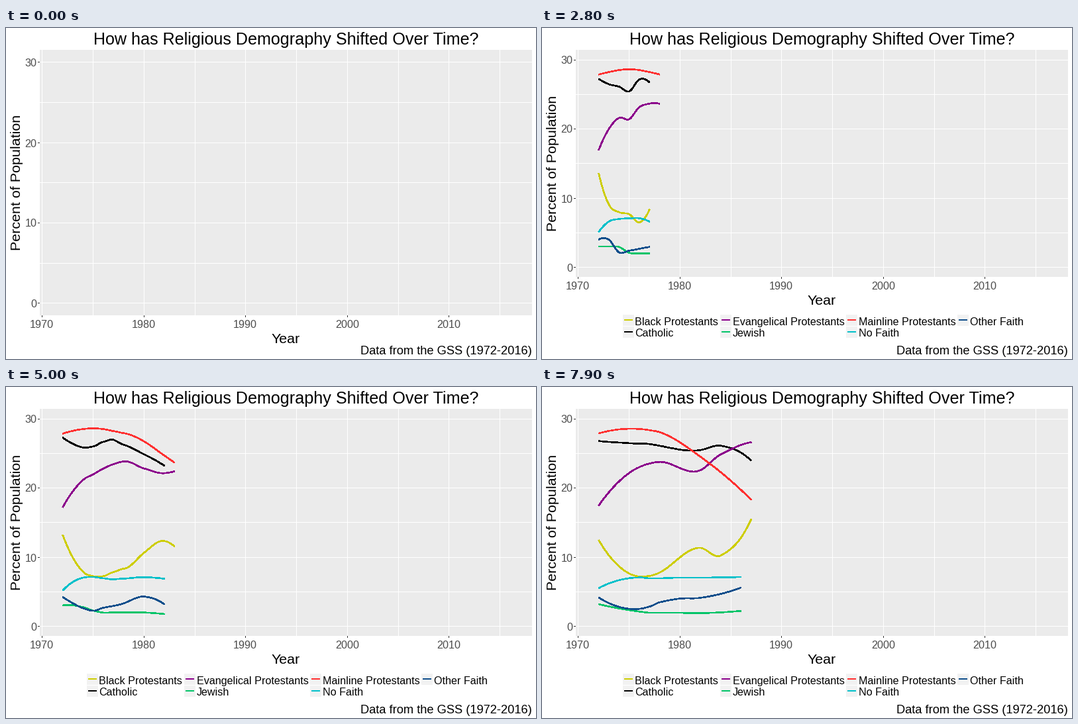
Write a matplotlib script that moves like this. It is 800 by 500 pixels and loops after 8000 ms.

```python
import numpy as np
import matplotlib.pyplot as plt
from matplotlib.animation import FuncAnimation
from matplotlib.patches import Rectangle

W, H, DPI = 800, 500, 100
FRAMES, INTERVAL = 80, 100
LEFT, RIGHT, TOP = 51, 794, 33
FONT = "Liberation Sans"

YEARS = np.array([y for y in range(1972, 1988) if y not in (1979, 1981)], float)
T = YEARS - YEARS[0]


def bump(centre, width):
    return np.exp(-((T - centre) / width) ** 2)


def step(centre, rate):
    return 1 / (1 + np.exp(-rate * (T - centre)))


def settle(rate):
    return np.exp(-rate * T)


# Trend of each group in percent, in the order in which rows are revealed.
SHARES = {
    "Evangelical Protestants": 24 - 7 * settle(0.55) - 1.2 * bump(3, 0.5)
    - 1.8 * bump(10, 1) + 4.8 * bump(13.8, 2),
    "Mainline Protestants": 27.5 + 1.2 * bump(3, 3) - 7 * step(11.2, 1.6),
    "Black Protestants": 7.6 + 6 * settle(1.4) - 1.2 * bump(4, 0.5)
    + 1.1 * bump(5.5, 0.9) + 1.4 * bump(15, 1),
    "Catholic": 25.9 + 1.4 * settle(0.8) - 0.8 * bump(3, 0.5)
    + 1.4 * bump(4.3, 1) - 0.9 * bump(8, 1.2) + 1.5 * bump(11.5, 2),
    "Jewish": 3 - step(2.5, 5) + 0.4 * step(14, 1.5),
    "Other Faith": 4 - 1.9 * step(1.5, 8) + 0.28 * np.maximum(T - 2, 0)
    + 0.9 * bump(8, 0.8) - 0.8 * bump(10, 0.5),
    "No Faith": 7.1 - 2 * settle(1.4) - 0.5 * bump(5, 0.5)
    + 0.8 * bump(10, 0.5),
}
COLORS = {
    "Black Protestants": "#CDCD00", "Catholic": "#000000",
    "Evangelical Protestants": "#8B008B", "Jewish": "#00C468",
    "Mainline Protestants": "#FF3030", "No Faith": "#00C0CA",
    "Other Faith": "#104E8B",
}
GROUPS = list(SHARES)
KEY_COLUMNS = [122, 269, 459, 627]

# Two survey years oversampled one group, which dilutes all the others.
OVERSAMPLE = 0.13
oversampled = np.isin(YEARS, (1982, 1987))
for group, share in SHARES.items():
    share[oversampled] *= 1 - OVERSAMPLE
SHARES["Black Protestants"][oversampled] += 100 * OVERSAMPLE


def cell_cuts(x, low, high, limit):
    """Cut points of a k-d tree whose cells hold at most `limit` points."""
    if high - low + 1 <= limit:
        return set()
    if low == high:
        return {x[low - 1]}
    mid = (low + high) // 2
    return ({x[mid - 1]} | cell_cuts(x, low, mid, limit)
            | cell_cuts(x, mid + 1, high, limit))


def local_fit(x, y, at, neighbours):
    """Value and slope of the tricube-weighted local quadratic."""
    dist = np.abs(x - at)
    radius = np.sort(dist)[neighbours - 1]
    weight = np.where(dist < 0.9995 * radius,
                      (1 - np.minimum(dist / radius, 1) ** 3) ** 3, 0)
    root = np.sqrt(weight)
    design = np.vander(x - at, 3, increasing=True) * root[:, None]
    norm = np.linalg.norm(design, axis=0)
    norm[norm == 0] = 1
    coef = np.linalg.lstsq(design / norm, y * root, rcond=1e-10)[0] / norm
    return coef[0], coef[1]


def loess(x, y, span=0.75, samples=80):
    """Local regression at tree vertices, joined by cubic Hermite pieces."""
    n = len(x)
    margin = 0.005 * max(x[-1] - x[0], 0.001 * x[-1])
    cuts = cell_cuts(x, 1, n, int(n * span * 0.2))
    knots = np.array(sorted(cuts | {x[0] - margin, x[-1] + margin}))
    neighbours = int(n * span + 1e-5)
    value, slope = np.array([local_fit(x, y, k, neighbours) for k in knots]).T

    grid = np.linspace(x[0], x[-1], samples)
    i = np.clip(np.searchsorted(knots, grid, "right") - 1, 0, len(knots) - 2)
    h = knots[i + 1] - knots[i]
    t = (grid - knots[i]) / h
    curve = ((1 + 2 * t) * (1 - t) ** 2 * value[i]
             + t * (1 - t) ** 2 * h * slope[i]
             + t * t * (3 - 2 * t) * value[i + 1]
             + t * t * (t - 1) * h * slope[i + 1])
    return grid, curve


fig = plt.figure(figsize=(W / DPI, H / DPI), dpi=DPI, facecolor="white")
ax = fig.add_axes([0, 0, 1, 1])


def box(x, y, w, h, color):
    ax.add_patch(Rectangle((x, y), w, h, fc=color, lw=0, antialiased=False))


def label(x, y, text, px, color="black", ha="center", rotation=0):
    ax.text(x, y, text, size=px * 72 / DPI, color=color, ha=ha, va="baseline",
            family=FONT, rotation=rotation, rotation_mode="anchor")


def stroke(x, y, color):
    ax.plot(x, y, color=color, lw=1.6 * 72 / DPI, antialiased=False,
            solid_capstyle="butt", solid_joinstyle="round")


def x_pixel(year):
    return 54.9 + 15.35 * (year - 1970)


def draw_panel(bottom, zero, unit):
    box(LEFT, TOP, RIGHT - LEFT, bottom - TOP, "#EBEBEB")
    for pct in range(0, 31, 5):
        row = int(zero - unit * pct)
        box(LEFT, row, RIGHT - LEFT, 1, "white")
        if pct % 10 == 0:
            box(LEFT - 3, row, 3, 1, "#333333")
            label(46.5, row + 6.5, str(pct), 16.1, "#4D4D4D", "right")
    for year in range(1970, 2016, 5):
        col = int(x_pixel(year))
        box(col, TOP, 1, bottom - TOP, "white")
        if year % 10 == 0:
            box(col, bottom, 1, 3, "#333333")
            label(col, bottom + 19, str(year), 16.1, "#4D4D4D")
    label(422.5, TOP - 8, "How has Religious Demography Shifted Over Time?", 25.1)
    label(422.5, bottom + 41.5, "Year", 21.5)
    label(22, (TOP + bottom) / 2, "Percent of Population", 21.5, rotation=90)
    label(RIGHT, 493, "Data from the GSS (1972-2016)", 18.3, ha="right")


def draw_legend():
    for i, name in enumerate(sorted(COLORS)):
        x, y = KEY_COLUMNS[i // 2], 433 + 18 * (i % 2)
        box(x, y, 17, 17, "#F2F2F2")
        stroke([x + 2, x + 15], [y + 8, y + 8], COLORS[name])
        label(x + 18.5, 449 + 17 * (i % 2), name, 16.1, ha="left")


def draw(frame):
    ax.clear()
    ax.set(xlim=(0, W), ylim=(H, 0))
    ax.axis("off")
    if frame < 5:
        draw_panel(434, 415.9, 12.14)
        return
    zero, unit = 361.2, 10.415
    draw_panel(376, zero, unit)
    rows = frame + 16  # one more survey row per frame
    for name in sorted(COLORS):
        n = (rows - GROUPS.index(name) + 6) // 7
        year, pct = loess(YEARS[:n], SHARES[name][:n])
        stroke(x_pixel(year), zero - unit * pct, COLORS[name])
    draw_legend()


anim = FuncAnimation(fig, draw, frames=FRAMES, interval=INTERVAL,
                     init_func=lambda: None, repeat=True, repeat_delay=0)
plt.show()
```
